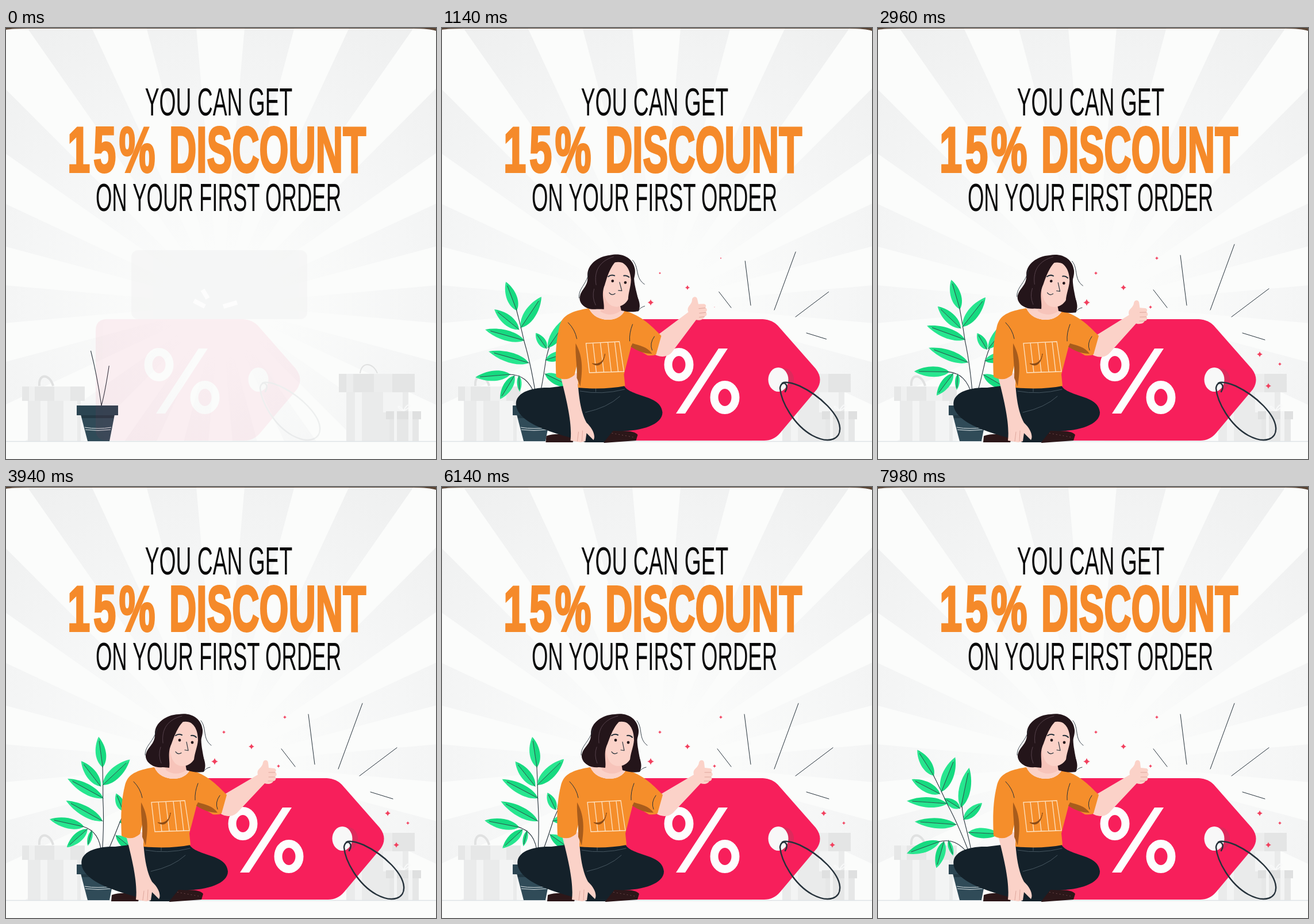
Write an HTML page that moves like this. It is 748 px wide and 749 px high and loops after 8 s.

```html
<!DOCTYPE html>
<html lang="en">
<head>
<meta charset="utf-8">
<title>Discount</title>
<style>
html, body { margin: 0; width: 100%; height: 100%; overflow: hidden; background: #fbfcfb; }
svg { display: block; width: 100vw; height: 100vh; }
text { font-family: "Liberation Sans", Arial, sans-serif; }
.thin { font-size: 69px; text-anchor: middle; fill: #0a0a0a; }
.big { font-size: 112px; font-weight: 700; fill: #f58a2a; stroke: #f58a2a; stroke-width: 4; }
.line { fill: none; stroke: #26323b; stroke-linecap: round; stroke-linejoin: round; }
</style>
</head>
<body>
<svg viewBox="0 0 748 749">
  <defs>
    <radialGradient id="rayFill" gradientUnits="userSpaceOnUse" cx="373" cy="480" r="600">
      <stop offset=".15" stop-color="#fbfcfb"/>
      <stop offset=".55" stop-color="#f5f6f6"/>
      <stop offset="1" stop-color="#eeefef"/>
    </radialGradient>
    <clipPath id="card"><path d="M0 3Q10 1 40 1H708Q736 1 748 5V749H0Z"/></clipPath>
  </defs>
  <rect width="748" height="14" fill="#5b4636"/>
  <g clip-path="url(#card)">
    <rect width="748" height="749" fill="#fbfcfb"/>
    <g id="rays" fill="url(#rayFill)"></g>
    <rect y="719" width="748" height="30" fill="#fbfcfb"/>
  </g>

  <text class="thin" transform="translate(370 152) scale(.54 1)">YOU CAN GET</text>
  <g class="big">
    <text transform="translate(107 250) scale(.63 1)" letter-spacing="9">15%</text>
    <text transform="translate(284 250) scale(.585 1)">DISCOUNT</text>
  </g>
  <text class="thin" transform="translate(369.5 318) scale(.53 1)">ON YOUR FIRST ORDER</text>

  <g id="ghost">
    <rect x="218" y="386" width="306" height="120" rx="12" fill="#f1f2f2"/>
    <path d="M342 455L351 470M327 474L346 484M378 484L402 477" stroke="#fff" stroke-width="8"/>
  </g>

  <g fill="#eaebeb">
    <path d="M38 648H130V718H38Z"/>
    <path d="M28 623H137V648H28Z" fill="#e6e7e7"/>
    <path d="M60 648H72V718H60ZM100 648H124V718H100Z" fill="#f3f4f4"/>
    <path d="M40 623H50V648H40ZM84 623H112V648H84Z" fill="#eff0f0"/>
    <path d="M58 622C56 600 76 600 82 622" fill="none" stroke="#e0e1e1" stroke-width="4"/>
    <path d="M592 633H700V718H592Z"/>
    <path d="M579 601H711V633H579Z" fill="#e4e5e5"/>
    <path d="M607 633H619V718H607ZM656 633H690V668H656Z" fill="#f3f4f4"/>
    <path d="M592 601H604V633H592ZM640 601H672V633H640Z" fill="#eceded"/>
    <path d="M616 600C618 580 638 580 646 600" fill="none" stroke="#e0e1e1" stroke-width="2"/>
    <path d="M667 680H718V718H667Z" fill="#e6e7e7"/>
    <path d="M661 666H722V680H661Z" fill="#dfe0e0"/>
    <path d="M675 666H680V718H675ZM700 666H707V718H700Z" fill="#f3f4f4"/>
    <path d="M692 665C680 650 678 662 692 665C698 648 712 656 692 665" fill="none" stroke="#f8f9f9" stroke-width="2"/>
  </g>
  <path d="M0 718.5H748" stroke="#dde3e6" stroke-width="1.5"/>

  <g id="plant"></g>
  <g fill="#304b58">
    <path d="M130 672H189L180 718H142Z"/>
    <path d="M123 656H195V673H123Z" fill="#2b4552"/>
    <path d="M131 673H188L187 678H132Z" fill="#223843"/>
    <path d="M137 694Q160 698 183 694M138 698Q160 701 182 698" fill="none" stroke="#dfe6e8" stroke-width="1"/>
  </g>

  <g id="tag">
    <path d="M322 506H558Q574 507 584 517L650 592Q664 610 652 628L588 704Q577 717 560 717H322Q302 717 302 697V526Q302 506 322 506Z" fill="#f71f5b"/>
    <path d="M322 506Q302 506 302 526V697Q302 717 322 717Q314 715 314 697V526Q314 508 322 506Z" fill="#c9144a" opacity=".4"/>
    <g fill="none" stroke="#fdfdfd" stroke-width="14">
      <ellipse cx="412" cy="585" rx="18.500" ry="22"/>
      <ellipse cx="492" cy="642" rx="18.500" ry="22"/>
    </g>
    <path d="M481 557H497L423 670H407Z" fill="#fdfdfd"/>
    <ellipse cx="594" cy="611" rx="18" ry="20" fill="#dd2a5c"/>
    <ellipse cx="585" cy="611" rx="17.500" ry="21" fill="#f8f8f8"/>
    <path class="line" stroke-width="2.500" d="M597 632C606 618 590 610 588 626C590 650 612 690 644 708C674 724 694 714 692 694C690 672 660 640 622 622Q600 613 592 617"/>
  </g>

  <g id="burst"></g>
  <g id="stars" fill="#f2405e"></g>

  <g id="woman">
    <path d="M184 709C200 703 224 706 233 712L230 720H183Z" fill="#2c1719"/>
    <path d="M287 697C308 702 336 697 343 707L340 717L284 721Z" fill="#2c1719"/>
    <path d="M292 703L335 711" stroke="#69484a" stroke-dasharray="2 4" fill="none"/>
    <path d="M238 619H318C326 642 384 636 386 668C386 692 340 703 300 700L284 720H252C210 706 146 694 133 662C124 638 150 624 190 625Z" fill="#14212a"/>
    <path class="line" style="stroke:#465660" d="M243 631Q280 638 320 628M312 640Q290 660 252 668M270 622V632"/>
    <path d="M206 595L238 600C240 640 243 665 254 686C266 697 270 710 266 716L254 704L252 718L244 720L226 717C229 690 222 655 206 595Z" fill="#fbd2c8"/>
    <path class="line" stroke-width=".8" style="stroke:#d79c92" d="M240 702L238 718M247 700L246 718"/>
    <g id="arm">
      <path d="M370 540L438 500C435 489 446 489 447 479C448 474 455 473 456 479L457 488L467 489C471 491 470 494 468 495C472 498 471 502 468 503C471 506 469 511 465 511C463 516 456 517 450 515L404 564C394 576 378 573 368 564Z" fill="#fbd2c8"/>
      <path class="line" stroke-width=".8" style="stroke:#d79c92" d="M457 496H468M457 504H468M456 511H465"/>
    </g>
    <path d="M258 487C235 491 212 496 207 518C199 550 200 580 201 606Q218 616 233 603L240 574L239 625Q285 629 321 622L319 602L332 552L360 569Q371 570 375 567L384 535C368 519 352 501 320 491C312 512 270 514 258 487Z" fill="#f58e2b"/>
    <path d="M258 487C270 514 312 512 320 491L309 478H274Z" fill="#fbd2c8"/>
    <g fill="#a85c1c">
      <path d="M235 548C234 570 238 586 237 608L243 623C248 590 247 570 235 548Z"/>
      <path d="M334 548C346 552 360 554 368 566C354 566 344 562 331 554Z"/>
    </g>
    <path class="line" d="M222 512Q234 524 237 540M334 515Q328 530 329 544M372 536Q363 548 368 560"/>
    <path d="M253 548L311 545L319 597L259 599ZM265 547L271 599M278 547L284 598M291 546L297 598M303 546L309 597" fill="none" stroke="#fde3c4" stroke-width="1.300"/>
    <path d="M264 583C275 586 285 579 286 566C284 582 276 591 264 583Z" fill="#8a4b17" stroke="#8a4b17"/>
    <g id="head">
      <path d="M300 395C322 391 340 402 342 422C343 436 334 444 339 458C344 472 350 482 344 495C325 498 310 490 300 488L272 487C252 489 239 474 244 462C248 450 260 446 259 428C259 410 278 396 300 395Z" fill="#24151a"/>
      <path d="M282 450L278 492Q296 504 314 492L310 470Z" fill="#f7c4ba"/>
      <path d="M290 418C283 445 283 468 294 480C304 489 320 486 328 472C335 456 338 440 335 420C322 403 302 405 290 418Z" fill="#fbd2c8"/>
      <path d="M316 401C300 412 294 430 288 446C280 462 286 476 284 488L266 486C264 450 266 402 302 397Z" fill="#24151a"/>
      <path d="M308 404C326 408 334 420 334 440C333 452 328 462 327 474C328 486 336 492 344 495C350 478 335 450 341 425Q336 396 308 404Z" fill="#24151a"/>
      <path class="line" stroke-width=".9" d="M339 406C350 420 341 437 357 449M343 495Q348 488 355 487M263 420C256 445 242 448 242 466"/>
      <path class="line" stroke-width=".7" style="stroke:#6b5560" d="M306 398C282 404 270 420 273 445M269 452Q264 466 270 480"/>
      <circle cx="302" cy="440" r="2.400" fill="#24151a"/><circle cx="324" cy="444" r="2.400" fill="#24151a"/>
      <path class="line" stroke-width="2" d="M295 432Q300 428 306 431M322 432Q327 431 331 435"/>
      <path class="line" stroke-width="1.200" d="M314 443L317 458L311 457M295 460Q299 466 305 462"/>
    </g>
  </g>
</svg>
<script>
const LOOP = 8000;
const $ = id => document.getElementById(id);
const add = (parent, tag, attrs = {}) => {
  const el = document.createElementNS('http://www.w3.org/2000/svg', tag);
  for (const k in attrs) el.setAttribute(k, attrs[k]);
  return parent.appendChild(el);
};
const ramp = (t, a, b) => Math.min(1, Math.max(0, (t - a) / (b - a)));
const ease = (t, a, b) => { const p = ramp(t, a, b); return p * p * (3 - 2 * p); };
const easeOut = (t, a, b) => 1 - (1 - ramp(t, a, b)) ** 3;
// Eased interpolation through [time, value] pairs
const track = (t, keys) => keys.reduce((v, [time, val], i) =>
  i ? v + (val - keys[i - 1][1]) * ease(t, keys[i - 1][0], time) : val, 0);
const move = (el, s) => el.setAttribute('transform', s);

for (let a = 10; a < 360; a += 20) {
  const edge = d => {
    const r = (a + d) * Math.PI / 180;
    return `${373 + 900 * Math.sin(r)} ${480 - 900 * Math.cos(r)}`;
  };
  add($('rays'), 'path', { d: `M373 480L${edge(-5)}L${edge(5)}Z` });
}

const leaves = [], stems = [];
function stem(parent, d, from) {
  stems.push([add(parent, 'path', { d, class: 'line', pathLength: 1, 'stroke-width': 1.1 }), from]);
}
// Base point, tip point, half width, start of growth
function leaf(parent, x, y, tx, ty, w, start) {
  const len = Math.hypot(tx - x, ty - y);
  const turn = Math.atan2(ty - y, tx - x) * 180 / Math.PI;
  const g = add(parent, 'g');
  const side = s => `M0 0C${len * .2} ${s * w * 1.3} ${len * .65} ${s * w * 1.35} ${len} 0Z`;
  add(g, 'path', { d: side(-1), fill: '#27e68f' });
  add(g, 'path', { d: side(1), fill: '#16da80' });
  add(g, 'path', { d: `M0 0L${len * .86} 0`, class: 'line', 'stroke-width': .8 });
  leaves.push({ g, pose: `translate(${x} ${y}) rotate(${turn})`, start });
}
const right = add($('plant'), 'g');
const left = add($('plant'), 'g');
const branch = add(left, 'g');
stem(left, 'M166 656C160 615 152 575 143 545Q137 518 129 488', .56);
stem(branch, 'M163 640C152 612 138 602 116 602', 0);
stem(right, 'M166 656C173 630 178 596 181 575Q184 560 190 546', .62);
[
  [left, 130, 491, 111, 441, 9, 260], [left, 137, 521, 173, 467, 10, 210],
  [left, 134, 524, 91, 489, 9, 180], [left, 143, 543, 75, 524, 9, 120],
  [left, 151, 582, 81, 562, 9, 0], [branch, 119, 602, 58, 607, 9, 90],
  [branch, 126, 604, 101, 645, 8, 120], [branch, 134, 604, 135, 632, 4, 150],
  [right, 184, 556, 224, 498, 10, 230], [right, 182, 557, 163, 530, 7, 200],
  [right, 180, 577, 221, 563, 8, 150], [right, 179, 601, 229, 625, 9, 60]
].forEach(l => leaf(...l));

const burst = [
  [503, 486, 479, 455], [537, 482, 526, 395], [578, 490, 620, 376],
  [615, 502, 680, 453], [634, 530, 673, 542]
].map(([x, y, x2, y2]) => ({
  el: add($('burst'), 'line', { x1: x, y1: y, class: 'line', 'stroke-width': 1 }),
  x, y, dx: x2 - x, dy: y2 - y
}));

const stars = [
  [363, 477, 6], [427, 451, 5], [379, 426, 3], [485, 400, 3],
  [474, 485, 3], [664, 567, 5], [699, 584, 3], [679, 622, 5]
].map(([x, y, r]) => ({ el: add($('stars'), 'path', { d: 'M0-1Q.2-.2 1 0Q.2.2 0 1Q-.2.2-1 0Q-.2-.2 0-1Z' }), x, y, r }));

function draw(t) {
  $('ghost').setAttribute('opacity', .5 * (1 - ramp(t, 0, 200)));

  move($('tag'), `translate(${-146 * (1 - ease(t, 0, 950))} 0)`);
  $('tag').setAttribute('opacity', .06 + .94 * ramp(t, 0, 480));

  move($('woman'), `translate(${-146 * (1 - ease(t, 264, 1214))} 0)`);
  $('woman').setAttribute('opacity', ramp(t, 400, 1100));
  move($('arm'), `rotate(${track(t, [[300, -25], [1300, -5], [1900, -4], [3600, 0]])} 378 560)`);
  move($('head'), `rotate(${track(t, [[300, -4], [1900, -3], [3600, 0]])} 295 485)`);

  const sway = track(t, [[2000, 0], [5200, 20], [8100, -12]]);
  move(left, `rotate(${sway} 166 655)`);
  move(branch, `rotate(${sway * .3} 163 640)`);
  move(right, `rotate(${track(t, [[2000, 0], [5200, 20], [8100, -23]])} 166 655)`);
  for (const [el, from] of stems) {
    const p = from + (1 - from) * easeOut(t, 0, 420);
    el.setAttribute('stroke-dasharray', `${p} 2`);
    el.setAttribute('visibility', p > 0 ? 'visible' : 'hidden');
  }
  for (const { g, pose, start } of leaves)
    move(g, `${pose} scale(${easeOut(t, start, start + 420)})`);

  const grow = ease(t, 540, 1300);
  for (const { el, x, y, dx, dy } of burst) {
    el.setAttribute('x2', x + dx * grow);
    el.setAttribute('y2', y + dy * grow);
    el.setAttribute('visibility', grow > 0 ? 'visible' : 'hidden');
  }
  stars.forEach(({ el, x, y, r }, i) =>
    move(el, `translate(${x} ${y}) scale(${r * easeOut(t, 950 + i * 40, 1300 + i * 40)})`));
}

let begin;
function tick(now) {
  begin ??= now;
  draw((now - begin) % LOOP);
  requestAnimationFrame(tick);
}
draw(0);
requestAnimationFrame(tick);
</script>
</body>
</html>
```
